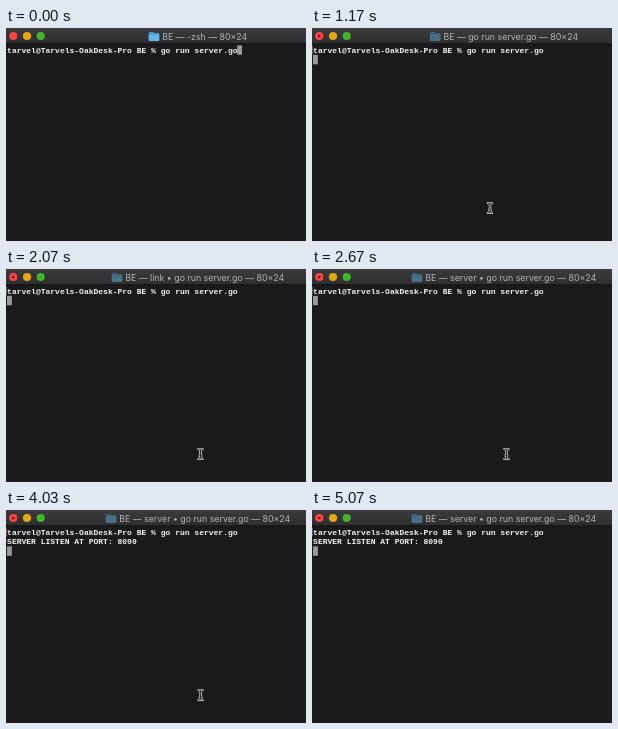
An HTML page with a canvas for the animation above (5710 ms loop, 300 by 213 pixels).

```html
<!DOCTYPE html>
<html lang="en">
<head>
<meta charset="utf-8">
<title>Terminal</title>
<style>
html, body { margin: 0; width: 100%; height: 100%; overflow: hidden; background: #1b1a1c; }
canvas { display: block; width: 300px; height: 213px; }
</style>
</head>
<body>
<canvas id="stage"></canvas>
<script>
const W = 300, H = 213, LOOP = 5710;
const ROW = 9.55, LEFT = 1.1;
const MONO = 'bold 8px "Liberation Mono", monospace';
const SANS = '8.8px Inter, "DejaVu Sans", sans-serif';
const PROMPT = 'tarvel@Tarvels-OakDesk-Pro BE % go run server.go';
const REPLY = 'SERVER LISTEN AT PORT: 8090';

const ENTER = 230, RUN = 400, LISTEN = 3000;
const titles = [
  [0, '-zsh'],
  [RUN, 'go run server.go'],
  [1470, 'go • go run server.go'],
  [1800, 'link • go run server.go'],
  [2670, 'server • go run server.go']
];

// Pointer path: time, x, y
const path = [
  [1000, 152, 170], [1100, 164, 175], [1167, 178, 180], [1267, 194.5, 185],
  [4033, 194.5, 185], [4100, 201, 183], [4167, 218, 177], [4233, 227.5, 171],
  [4300, 228, 170.5], [4433, 228, 170.5], [4467, 228, 184], [4500, 228, 204], [4533, 228, 222]
];

const canvas = document.getElementById('stage');
const ctx = canvas.getContext('2d');
const dpr = window.devicePixelRatio || 1;
canvas.width = W * dpr;
canvas.height = H * dpr;

const barFill = ctx.createLinearGradient(0, 0, 0, 15.5);
barFill.addColorStop(0, '#3b3a3c');
barFill.addColorStop(1, '#2f2e30');

function rect(x, y, w, h, color) {
  ctx.fillStyle = color;
  ctx.fillRect(x, y, w, h);
}

function dot(x, r, color) {
  ctx.fillStyle = color;
  ctx.beginPath();
  ctx.arc(x, 8, r, 0, Math.PI * 2);
  ctx.fill();
}

function folder(x, back, front) {
  ctx.fillStyle = back;
  ctx.beginPath();
  ctx.roundRect(x, 4, 5, 4, 0.8);
  ctx.roundRect(x, 5, 10.5, 7.5, 0.8);
  ctx.fill();
  ctx.fillStyle = front;
  ctx.beginPath();
  ctx.roundRect(x, 6.5, 10.5, 6.5, 0.8);
  ctx.fill();
}

function titleBar(t) {
  const running = t >= RUN;
  rect(0, 0, W, 15.5, barFill);
  rect(0, 15.5, W, 0.8, '#111012');
  ['#fc4544', '#e3a712', '#42b528'].forEach((c, i) => dot(7.3 + i * 13.7, 4.1, c));
  if (running) dot(7.3, 1.3, '#7a0d10');

  const name = titles.filter(([at]) => t >= at).pop()[1];
  const label = `BE — ${name} — 80×24`;
  ctx.font = SANS;
  const x = 192 - (ctx.measureText(label).width + 13.5) / 2;
  if (running) folder(x, '#3b627a', '#487086');
  else folder(x, '#3f9bd0', '#62b6e6');
  ctx.fillStyle = '#b4b3b5';
  ctx.fillText(label, x + 13.5, 11.7);
}

function line(text, row) {
  ctx.font = MONO;
  ctx.fillStyle = '#f4f4f4';
  ctx.fillText(text, LEFT, 24.5 + row * ROW);
}

function caret(x, row) {
  rect(x, 17.3 + row * ROW, 4.9, 9.4, '#9a999b');
}

function shell(t) {
  line(PROMPT, 0);
  if (t < ENTER) {
    caret(LEFT + ctx.measureText(PROMPT).width - 0.4, 0);
    return;
  }
  rect(0, 17.8, 0.7, 8.4, '#77767a');
  const done = t >= LISTEN;
  if (done) line(REPLY, 1);
  caret(1, done ? 2 : 1);
}

function pointerAt(t) {
  const i = path.findIndex(p => p[0] > t);
  if (i < 1) return null;
  const [t0, x0, y0] = path[i - 1], [t1, x1, y1] = path[i];
  const k = (t - t0) / (t1 - t0);
  return [x0 + (x1 - x0) * k, y0 + (y1 - y0) * k];
}

function pointer(t) {
  // The pointer is redrawn thirty times a second
  const pos = pointerAt(Math.floor((t + 4) * 0.03) / 0.03 + 0.5);
  if (!pos) return;
  ctx.save();
  ctx.translate(...pos);
  ctx.lineCap = 'round';
  ctx.beginPath();
  for (const s of [-1, 1]) {
    ctx.moveTo(-2, 4.9 * s);
    ctx.quadraticCurveTo(0, 4.9 * s, 0, 3.4 * s);
    ctx.quadraticCurveTo(0, 4.9 * s, 2, 4.9 * s);
  }
  ctx.moveTo(0, -4);
  ctx.lineTo(0, 4);
  ctx.moveTo(-0.8, 1.6);
  ctx.lineTo(0.8, 1.6);
  for (const [w, c] of [[2.4, '#d6d6d6'], [0.9, '#18171a']]) {
    ctx.lineWidth = w;
    ctx.strokeStyle = c;
    ctx.stroke();
  }
  ctx.restore();
}

function draw(t) {
  ctx.setTransform(dpr, 0, 0, dpr, 0, 0);
  rect(0, 0, W, H, '#1b1a1c');
  titleBar(t);
  shell(t);
  pointer(t);
}

const start = performance.now();
function tick() {
  draw((performance.now() - start) % LOOP);
  requestAnimationFrame(tick);
}
tick();
</script>
</body>
</html>
```
